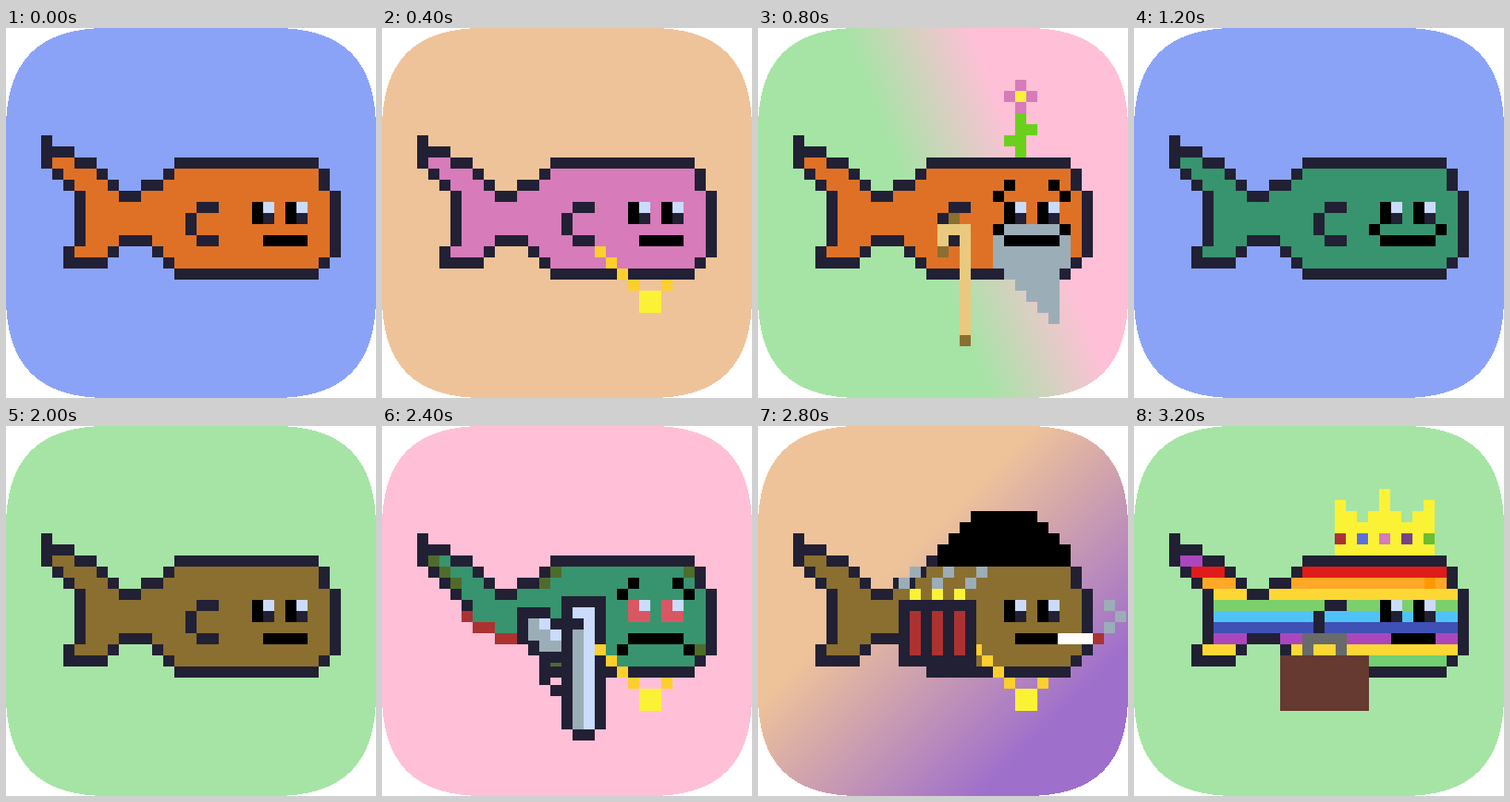
Recreate the animation shown at these times as an HTML page. Size 400x400 px, loop 3.6 s.

```html
<!DOCTYPE html>
<html lang="en">
<head>
<meta charset="utf-8">
<title>Pixel fish</title>
<style>
html, body { margin: 0; width: 100%; height: 100%; overflow: hidden; background: #fff; }
svg { display: block; width: 100vw; height: 100vh; }
</style>
</head>
<body>
<svg viewBox="0 0 400 400" shape-rendering="crispEdges">
  <defs id="defs"></defs>
  <path id="card" d="M0 110C0 35 35 0 110 0H290C365 0 400 35 400 110V290C400 365 365 400 290 400H110C35 400 0 365 0 290Z"/>
  <g id="art" transform="translate(38 128) scale(12)"></g>
</svg>
<script>
const STEP = 400;
const ink = '#222034', black = '#000', glint = '#cbdbfc', grey = '#9badb7', white = '#fff';
const orange = '#df7126', rose = '#d77bba', moss = '#37946e', olive = '#8a6f30', lichen = '#4f6b2c';
const yellow = '#fbf236', gold = '#fdcf2e', red = '#ac3232', brown = '#663931';
const blue = '#8ba3f7', mint = '#a5e4a5', pink = '#ffc0d7', peach = '#eec39a', violet = '#9f6fcc';

const clamp = (v, low, high) => Math.min(high, Math.max(low, v));
const repeat = (n, make) => Array.from({ length: n }, (_, i) => make(i)).join('');

// One unit is one big pixel; the fish starts at 0,0.
const box = (color, x, y, w = 1, h = 1) =>
  `<rect x="${x}" y="${y}" width="${w}" height="${h}" fill="${color}"/>`;
const nudge = (dx, dy, art) => `<g transform="translate(${dx / 12} ${dy / 12})">${art}</g>`;
// Two cells mirrored about the middle of the face.
const pair = (color, dx, y) => box(color, 21 - dx, y) + box(color, 21 + dx, y);

function fill(color, inside) {
  let d = '';
  for (let y = -6; y < 18; y++)
    for (let x = 0; x < 30; x++)
      if (inside(x, y)) d += `M${x} ${y}h1v1h-1z`;
  return `<path fill="${color}" d="${d}"/>`;
}

function gradient(id, [x1, y1, x2, y2], colors) {
  const marks = colors.map(([at, c]) => `<stop offset="${at}" stop-color="${c}"/>`).join('');
  return `<linearGradient id="${id}" gradientUnits="userSpaceOnUse" x1="${x1}" y1="${y1}" x2="${x2}" y2="${y2}">${marks}</linearGradient>`;
}
const blend = (id, line, from, to) => gradient(id, line, [[0, from], [1, to]]);
const diagonal = [150, 150, 320, 320];
const bands = ['#ab47bc', '#e01b1b', '#ffa726', '#fdd835', '#7bd06c',
  '#4fc3f7', '#3f51b5', '#ab47bc', '#fdd835', '#71d071'];
document.getElementById('defs').innerHTML =
  blend('meadow', [90, 0, 211, -48], mint, pink) +
  blend('dawn', diagonal, blue, pink) +
  blend('dusk', diagonal, peach, violet) +
  gradient('rainbow', [0, 1, 0, 11], bands.flatMap((c, i) => [[i / 10, c], [(i + 1) / 10, c]]));

// The body lies between a top and a bottom profile; the tail ends at x = 8.
function inBody(x, y, torn) {
  if (x > 25) return false;
  if (x === 25) return y >= 4 && y <= 9;
  if (x > 8) return y >= clamp(14 - x, 2, 4) && y <= Math.min(x - 2, 10);
  const left = torn ? Math.min(y, 5) : y < 9 ? Math.min(y, 4) : 3;
  const top = Math.min(5, Math.max(Math.ceil(x / 2), x - 2));
  const bottom = torn ? Math.ceil(x / 2) + 3 : clamp(14 - x, 7, 9);
  return x >= left && y >= top && y <= bottom;
}

function fish(color, torn = false) {
  const body = (x, y) => inBody(x, y, torn);
  const edge = (x, y) => !body(x, y) &&
    (body(x - 1, y) || body(x + 1, y) || body(x, y - 1) || body(x, y + 1));
  const wound = (x, y) => torn && x < 9 && y > 5 && edge(x, y) && y <= Math.ceil(x / 2) + 4;
  return fill(color, body) + fill(ink, edge) + fill(red, wound) +
    box(ink, 0, 0) + (torn ? '' : box(ink, 2, 10) + fin());
}

const fin = () => box(ink, 14, 5, 2) + box(ink, 13, 6, 1, 2) + box(ink, 14, 8, 2);

const zombie = () => fish(moss, true) +
  repeat(3, i => box(lichen, i + 1, i + 1)) +
  repeat(2, i => box(lichen, 11 + i, 3 - i)) +
  box(lichen, 24, 2) + box(lichen, 25, 9) + box(lichen, 12, 10);

const eyes = () => repeat(2, i =>
  box(black, 19 + 3 * i, 5, 1, 2) + box(glint, 20 + 3 * i, 5) + box(ink, 20 + 3 * i, 6));
const soreEyes = () => repeat(2, i =>
  box('#d95763', 19 + 3 * i, 5, 2, 2) + box(glint, 20 + 3 * i, 5));
const brows = () => pair(black, 2, 3) + pair(black, 3, 4);
const mouth = () => box(black, 20, 8, 4);
const smile = () => box(black, 19, 8, 5) + pair(black, 3, 7);
const frown = () => box(black, 19, 8, 5) + pair(black, 3, 9);

const flower = () =>
  box('#6bd01c', 20, -3, 1, 4) + box('#6bd01c', 21, -2) + box('#6bd01c', 19, -1) +
  fill(rose, (x, y) => Math.abs(x - 20) + Math.abs(y + 5) === 1) + box(yellow, 20, -5);

const beard = () => fill(grey, (x, y) =>
  y >= 7 && (y <= 10 ? Math.abs(x - 21) <= 3 : x >= y + 8 && x <= 23));

const cane = () =>
  box('#e9c97e', 13, 7, 3) + box('#e9c97e', 13, 8) + box('#e9c97e', 15, 8, 1, 9) +
  box(olive, 14, 6) + box(olive, 13, 9) + box(olive, 15, 17);

const bunny = () =>
  repeat(2, i => box(white, 15 + 6 * i, -6, 3, 6) + box(rose, 16 + 6 * i, -5, 1, 4)) +
  box(white, 15, 0, 9);

const cookie = () =>
  fill('#8f563b', (x, y) => Math.max(Math.abs(x - 11), Math.abs(y - 6)) <= 2 &&
    Math.abs(x - 11) + Math.abs(y - 6) < 4) +
  repeat(3, i => box(brown, 12, 4 + 2 * i)) +
  repeat(2, i => box(brown, 11 + 2 * i, 7)) + box(brown, 10, 5);

const pistol = () => nudge(0, -4,
  box(ink, 9, 6, 3, 3) + box(ink, 10, 9, 3) + box(ink, 11, 10, 2) + box(ink, 11, 11, 1, 2) +
  box(ink, 12, 7) + box(ink, 12, 13) +
  box(grey, 10, 7, 2, 2) + box(grey, 11, 9, 2) + box(glint, 11, 7) + box(glint, 12, 8) +
  box(ink, 13, 5, 4, 12) + box(ink, 14, 17, 2) +
  box(glint, 14, 6, 2) + box(glint, 15, 7, 1, 10) + box(grey, 14, 8, 1, 9));

const chain = () =>
  repeat(4, i => box(gold, 16 + i, 9 + i)) + box(gold, 22, 12) + box(yellow, 20, 13, 2, 2);

const afro = () => fill(black, (x, y) =>
  y >= -3 && y <= 1 && Math.abs(x - 18.5) <= 5.5 + Math.min(y, 0));

const dynamite = () => nudge(6, 0, box(ink, 9, 5, 7, 6) + repeat(3, i =>
  nudge(-6, 0, box(grey, 10.5 + 3 * i, 2) + box(grey, 9.5 + 3 * i, 3)) +
  box(yellow, 10 + 2 * i, 4) + box(red, 10 + 2 * i, 6, 1, 4)));

const cigarette = () => box(white, 23.85, 8, 3.15) + box(red, 27, 8) +
  repeat(3, i => box(grey, 28 + i % 2, 5 + i));

function crown() {
  const spike = x => Math.min((x - 15) % 4, (23 - x) % 4);
  const inside = (x, y) => x >= 15 && x <= 23 && y <= 0 &&
    (y >= -2 || spike(x) <= y + 4 || (x === 19 && y === -5));
  const gems = [red, '#5b6ee1', rose, '#76428a', '#6abe30'];
  return nudge(-1, 0, fill(yellow, inside) + gems.map((c, i) => box(c, 15 + 2 * i, -1)).join(''));
}

const briefcase = () =>
  box('#696a6a', 12, 8, 4) + box('#696a6a', 12, 9) + box('#696a6a', 15, 9) + box(brown, 10, 10, 8, 5);

const scenes = [
  [blue, fish(orange), eyes(), mouth()],
  [peach, fish(rose), eyes(), mouth(), chain()],
  ['url(#meadow)', fish(orange), eyes(), beard(), brows(), smile(), flower(), cane()],
  [blue, fish(moss), eyes(), smile()],
  ['url(#dawn)', fish(rose), eyes(), smile(), bunny(), cookie()],
  [mint, fish(olive), eyes(), mouth()],
  [pink, zombie(), soreEyes(), brows(), frown(), pistol(), chain()],
  ['url(#dusk)', fish(olive), eyes(), mouth(), afro(), chain(), dynamite(), cigarette()],
  [mint, fish('url(#rainbow)'), box('#ff9800', 23, 3), eyes(), mouth(), crown(), briefcase()]
];

const card = document.getElementById('card'), art = document.getElementById('art');
let shown = -1;

function draw(time) {
  const index = Math.floor(time / STEP) % scenes.length;
  if (index === shown) return;
  const [backdrop, ...parts] = scenes[index];
  card.setAttribute('fill', backdrop);
  art.innerHTML = parts.join('');
  shown = index;
}

const start = performance.now();
function tick() {
  draw(performance.now() - start);
  requestAnimationFrame(tick);
}
tick();
</script>
</body>
</html>
```
